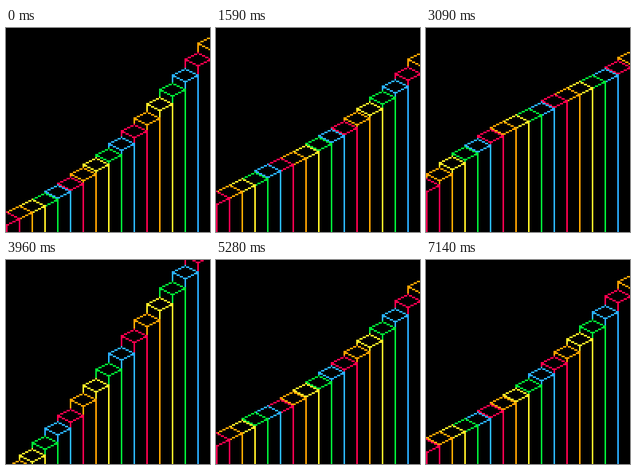
Write an HTML page with a canvas that moves like this. It is 256 by 256 pixels and loops after 7.17 s.

```html
<!DOCTYPE html>
<html lang="en">
<head>
<meta charset="utf-8">
<title>Wave of columns</title>
<style>
  html, body { margin: 0; width: 100%; height: 100%; overflow: hidden; background: #000; }
  canvas { display: block; width: 100%; height: 100%; image-rendering: pixelated; }
</style>
</head>
<body>
<canvas id="stage" width="128" height="128"></canvas>
<script>
const ctx = document.getElementById('stage').getContext('2d');
const COLORS = ['#ff004d', '#ffa300', '#ffec27', '#00e436', '#29adff'];
const SIZE = 128, COLUMNS = 17, HALF = 8;
const STEP_MS = 30, STEPS = 239;
const rad = Math.PI / 180;

// Height of the left and right corners of a column's top face
function cornerY(i, step) {
  const wave = Math.cos((6 * step + 9.5 * i - 83) * rad);
  return Math.floor(117.675 - 7.168 * i + 19 * wave);
}

function column(i, step) {
  const cx = i * HALF, y = cornerY(i, step);
  const slope = dx => (HALF - Math.abs(dx)) / 2;
  const upper = dx => y - Math.floor(slope(dx));
  const lower = dx => y + Math.ceil(slope(dx));

  // Black body hides the columns behind
  ctx.fillStyle = '#000';
  for (let dx = -HALF; dx <= HALF; dx++) {
    ctx.fillRect(cx + dx, upper(dx), 1, SIZE);
  }

  ctx.fillStyle = COLORS[i % COLORS.length];
  for (let dx = -HALF; dx <= HALF; dx++) {
    ctx.fillRect(cx + dx, upper(dx), 1, 1);
    ctx.fillRect(cx + dx, lower(dx), 1, 1);
  }
  for (const dx of [-HALF, 0, HALF]) {
    ctx.fillRect(cx + dx, lower(dx), 1, SIZE + HALF);
  }
}

function draw(step) {
  ctx.fillStyle = '#000';
  ctx.fillRect(0, 0, SIZE, SIZE);
  for (let i = COLUMNS - 1; i >= 0; i--) column(i, step);
}

const start = performance.now();
function tick() {
  const time = performance.now() - start;
  draw(Math.floor(time / STEP_MS) % STEPS);
  requestAnimationFrame(tick);
}
tick();
</script>
</body>
</html>
```
